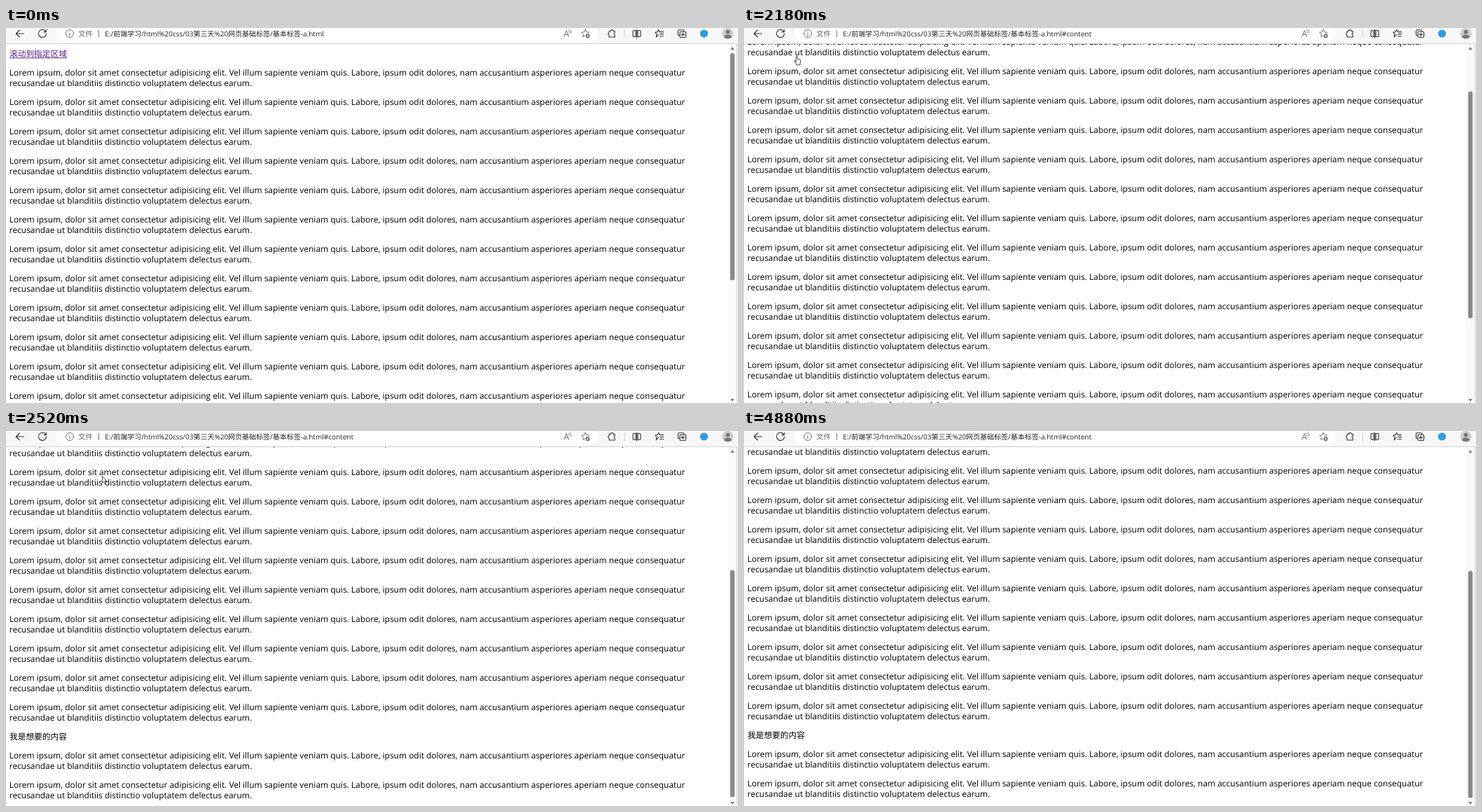
These frames come from a looping animation (1045x536 px, 5280 ms). An HTML page:

```html
<!DOCTYPE html>
<html lang="zh">
<head>
<meta charset="utf-8">
<title>Anchor scroll</title>
<style>
  html, body { margin: 0; width: 100%; height: 100%; overflow: hidden; background: #fff; }
  svg { display: block; width: 1045px; height: 536px; }
  text { font-family: "Open Sans", "Noto Sans CJK SC", "Noto Sans CJK", sans-serif; text-rendering: geometricPrecision; white-space: pre; }
  #page text { font-size: 11.95px; }
  #page .cjk { font-size: 11.7px; }
  .icon { fill: none; stroke: #333; stroke-width: 1.1; stroke-linecap: round; stroke-linejoin: round; }
  .soft { stroke: #666; }
</style>
</head>
<body>
<svg viewBox="0 0 1045 536">
  <rect width="1045" height="536" fill="#fff"/>
  <g id="page"></g>

  <rect width="1045" height="23" fill="#f7f7f7"/>
  <rect id="pill" x="72" y="-5" width="773" height="25" rx="12.5" fill="#fff"/>
  <path d="M0 22.5H1043.5V536" fill="none" stroke="#d2d2d2"/>
  <rect x="1044" y="23" width="1" height="513" fill="#f7f7f7"/>

  <g class="icon">
    <path d="M14.5 8H25.5M19.3 3L14.3 8L19.3 13"/>
    <path d="M57 5.4A5.6 5.6 0 1 0 57.6 8M57.4 2.2V5.6H54"/>
    <g class="soft">
      <circle cx="91" cy="8" r="5.5" stroke-width=".9"/>
      <path d="M91 7.6V10.8M91 5.4V5.5"/>
      <path d="M796.5 12.5L800 3.5L803.5 12.5M797.7 9.5H802.3" stroke-width=".9"/>
      <path d="M803 3Q805 4.5 804 6.8M805 1.8Q808 4.5 806.4 7.6" stroke-width=".8"/>
      <path id="star" stroke-width=".9"/>
      <circle cx="830.5" cy="11.3" r="3.4" fill="#555" stroke="#fff" stroke-width=".8"/>
      <path d="M828.8 11.3H832.2M830.5 9.6V13" stroke="#fff" stroke-width=".8"/>
    </g>
    <path d="M861 4.5H863.2A1.9 1.9 0 0 1 867 4.5H869.2V7A1.7 1.7 0 0 0 869.2 10.2V13H861V10.3A1.9 1.9 0 0 1 861 6.7Z"/>
    <path d="M883 2.5V13.5" stroke="#ccc" stroke-width="1"/>
    <path d="M899 3.5H896.3Q895 3.5 895 5V11.2Q895 12.5 896.3 12.5H899ZM902 3.5H904.7Q906 3.5 906 5V11.2Q906 12.5 904.7 12.5H902ZM900.5 2V14"/>
    <path d="M931.2 9.3L928.3 13L928.7 8.8L926.8 6.2L930 5.6L931.7 2.6L933.3 5.6H938.5M934 8.6H938.5M933.5 11.7H938.5"/>
    <path d="M961.5 10.8H960.8Q959.5 10.8 959.5 9.5V4Q959.5 2.7 960.8 2.7H966.5Q967.8 2.7 967.8 4V4.8"/>
    <rect x="962" y="5.2" width="8.6" height="8.3" rx="1.6"/>
    <path d="M966.3 7.2V11.5M964.1 9.4H968.5"/>
  </g>
  <circle cx="996.5" cy="8" r="5.6" fill="#2f9be8"/>
  <circle cx="1030.5" cy="8" r="8" fill="#cfcbc8"/>
  <circle cx="1030.5" cy="5.6" r="2.9" fill="#777"/>
  <path d="M1025.2 13.4Q1025.2 9.6 1030.5 9.6Q1035.8 9.6 1035.8 13.4Q1030.5 16.4 1025.2 13.4Z" fill="#777"/>

  <text x="103" y="11.7" font-size="10.5" fill="#666">文件</text>
  <path d="M132.5 3V13" stroke="#777"/>
  <text id="url" x="141.3" y="11.5" font-size="10" fill="#222"></text>

  <rect x="1031" y="23" width="12" height="513" fill="#fafafa"/>
  <path d="M1034 31L1037 27L1040 31ZM1034 530L1037 534L1040 530Z" fill="#858585"/>
  <rect id="thumb" x="1033.8" y="36" width="6.4" height="324.6" rx="3.2" fill="#8a8a8a"/>

  <g id="status">
    <path d="M0 521.5H302Q305.5 521.5 305.5 525V536H0Z" fill="#dcdcdc"/>
    <text x="2.5" y="532.6" font-size="8.56" fill="#333"></text>
  </g>

  <g id="ime">
    <path d="M1000 536V526Q1000 522.5 1003.5 522.5H1045V536Z" fill="#2b2c2e"/>
    <path d="M1005 534.5V527.5H1022V534.5ZM1013.5 524V536" fill="none" stroke="#2b9fd8" stroke-width="1.5"/>
    <circle cx="1031" cy="529" r="1" fill="#ddd"/>
    <path d="M1036.3 532.5Q1037.5 534 1036 536" fill="none" stroke="#ddd" stroke-width="1.3"/>
  </g>

  <path id="arrow" d="M0 0V9.4L2.1 7.5L3.7 10.9L5.2 10.2L3.7 6.9H6.5Z" fill="#fff" stroke="#222" stroke-width=".8"/>
  <path id="hand" d="M-1.2 8V1Q-1.2 0 -.2 0Q.9 0 .9 1V4.4L4.4 5.2Q5.6 5.6 5.4 7L4.6 10.5V12.8H-.8V11.2L-3.4 7.7Q-3.6 6.3 -2.4 6.4Z" fill="#fff" stroke="#222" stroke-width=".85" stroke-linejoin="round"/>
</svg>
<script>
const LOOP = 5280;
const MAX_SCROLL = 259;
const $ = id => document.getElementById(id);
const page = $('page');

const LINES = [
  'Lorem ipsum, dolor sit amet consectetur adipisicing elit. Vel illum sapiente veniam quis. Labore, ipsum odit dolores, nam accusantium asperiores aperiam neque consequatur',
  'recusandae ut blanditiis distinctio voluptatem delectus earum.'
];
const URL_TEXT = 'E:/前端学习/html%20css/03第三天%20网页基础标签/基本标签-a.html';
const HASH = '#content';

function add(tag, attrs, text = '') {
  const el = document.createElementNS('http://www.w3.org/2000/svg', tag);
  for (const key in attrs) el.setAttribute(key, attrs[key]);
  el.textContent = text;
  page.append(el);
}

function addParagraph(y) {
  LINES.forEach((line, i) => add('text', { x: 4.8, y: y + i * 15.2 }, line));
}

add('text', { class: 'cjk', x: 5, y: 41.3, fill: '#551a8b' }, '滚动到指定区域');
add('rect', { x: 5, y: 42.4, width: 82, height: .9, fill: '#551a8b' });
for (let i = 0; i < 15; i++) addParagraph(68 + 42 * i);
add('text', { class: 'cjk', x: 5, y: 698.4 }, '我是想要的内容');
addParagraph(725);
addParagraph(767);

$('status').querySelector('text').textContent = 'file:///' + URL_TEXT.replaceAll('%20', ' ') + HASH;

const starPoints = Array.from({ length: 10 }, (_, i) => {
  const a = i * Math.PI / 5 - Math.PI / 2, r = i % 2 ? 2.8 : 5.8;
  return (827 + r * Math.cos(a)).toFixed(1) + ' ' + (8 + r * Math.sin(a)).toFixed(1);
});
$('star').setAttribute('d', 'M' + starPoints.join('L') + 'Z');

// Bursts of screen updates: start, end, count
const BURSTS = [
  [150, 610, 8], [680, 1200, 9], [1260, 1760, 8], [1820, 2320, 8], [2360, 2850, 8],
  [2920, 3260, 6], [3450, 3830, 6], [4210, 4570, 6], [4760, 4880, 3]
];
const TICKS = [0, ...BURSTS.flatMap(([a, b, n]) =>
  Array.from({ length: n }, (_, i) => Math.round((a + (b - a) * i / (n - 1)) / 10) * 10))];

// Pointer strokes: time, x, y
const STROKES = [
  [[150, 860, 526], [350, 700, 280], [500, 610, 135], [610, 580, 92.5],
   [680, 560, 88], [900, 330, 52], [1080, 190, 40], [1200, 142, 45],
   [1330, 98.5, 49], [1470, 83, 44], [1620, 77, 41], [1760, 75.5, 40],
   [2320, 75.5, 40], [2430, 91, 62], [2640, 230, 70], [2850, 430, 66],
   [2990, 506, 29.5], [3060, 522, 10], [3190, 530, 0], [3259, 532, -8]],
  [[3450, 490, 4], [3600, 430, 190], [3750, 335, 440], [3830, 302, 515],
   [4210, 270, 512], [4350, 130, 500], [4500, 23, 486], [4569, 23, 486]],
  [[4760, 915, 532], [4879, 915, 533]]
];

const SCROLL = [[0, 0], [2110, 14], [2180, 86], [2250, 165], [2320, 217], [2360, 236],
  [2430, 249], [2500, 257], [2570, MAX_SCROLL]];

function pointerAt(t) {
  const path = STROKES.find(s => t >= s[0][0] && t <= s[s.length - 1][0]);
  if (!path) return null;
  const i = Math.max(1, path.findIndex(p => p[0] >= t));
  const [t0, x0, y0] = path[i - 1], [t1, x1, y1] = path[i];
  const k = (t - t0) / (t1 - t0);
  return [x0 + (x1 - x0) * k, y0 + (y1 - y0) * k];
}

const show = (id, on) => $(id).setAttribute('visibility', on ? 'visible' : 'hidden');
const move = (id, x, y) => $(id).setAttribute('transform', `translate(${x} ${y})`);

function render(time) {
  const t = TICKS.findLast(tick => tick <= time);
  const scroll = SCROLL.findLast(s => s[0] <= t)[1];
  move('page', 0, -scroll);
  move('thumb', 0, scroll * 164 / MAX_SCROLL);
  $('url').textContent = URL_TEXT + (t >= 2110 ? HASH : '');
  show('status', t >= 1820 && t < 2110);
  show('ime', t >= 150 && t < 1820);

  const pos = pointerAt(t);
  const linked = t >= 1470 && t < 2360;
  show('arrow', pos && !linked);
  show('hand', pos && linked);
  if (pos) move(linked ? 'hand' : 'arrow', ...pos);
  $('pill').setAttribute('fill', pos && pos[1] < 20 ? '#f3f3f3' : '#fff');
}

const start = performance.now();
function frame() {
  render((performance.now() - start) % LOOP);
  requestAnimationFrame(frame);
}
frame();
</script>
</body>
</html>
```
